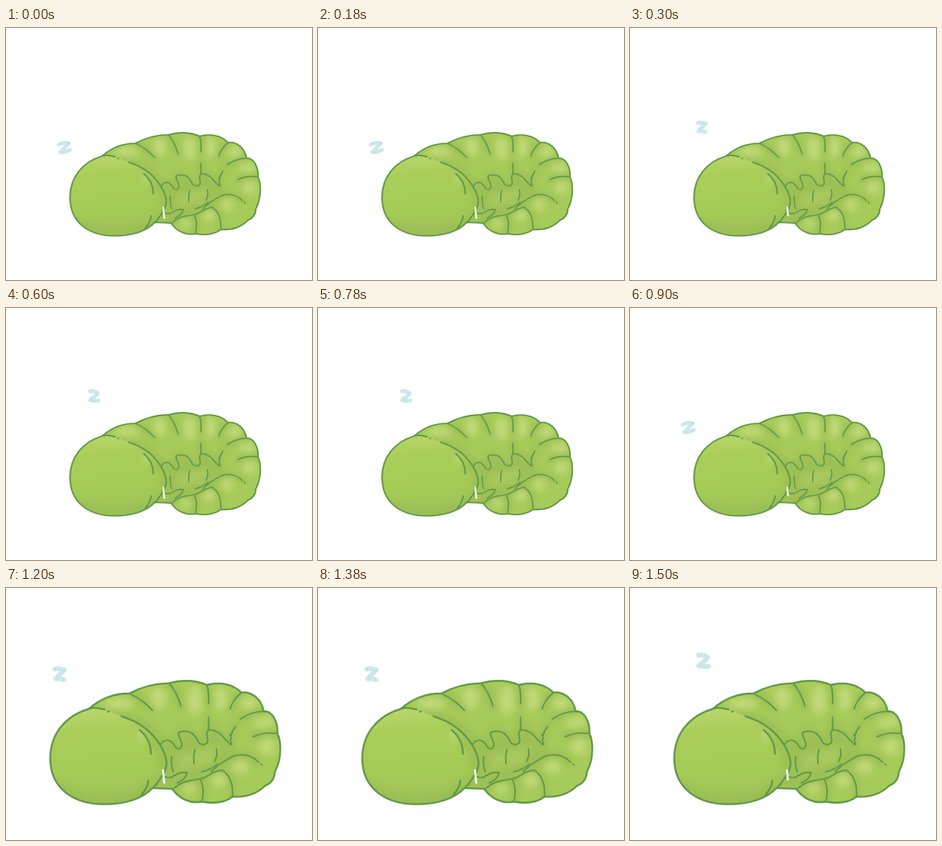
An HTML page that plays this animation: 430x354 px, repeating every 1800 ms.

```html
<!DOCTYPE html>
<html lang="en">
<head>
<meta charset="utf-8">
<title>Sleeping caterpillar</title>
<style>
  html, body { margin: 0; width: 100%; height: 100%; overflow: hidden; background: #fff; }
  svg { display: block; width: 430px; height: 354px; }
  path { stroke-linecap: round; stroke-linejoin: round; }
  .line { fill: none; stroke: #639a48; stroke-width: 2.2; }
  .fine { stroke-width: 1.8; }
  .soft { filter: url(#blur); }
  .shade { fill: none; stroke: #97b952; stroke-width: 9; opacity: .7; }
  .glow { fill: #bfd977; }
</style>
</head>
<body>
<svg viewBox="0 0 430 354">
  <defs>
    <filter id="blur" filterUnits="userSpaceOnUse" x="60" y="120" width="330" height="200">
      <feGaussianBlur stdDeviation="4"/>
    </filter>
    <linearGradient id="face" x1=".4" y1="0" x2=".5" y2="1">
      <stop offset="0" stop-color="#b9d66c"/>
      <stop offset=".2" stop-color="#abce5b"/>
      <stop offset=".65" stop-color="#a4cb55"/>
      <stop offset="1" stop-color="#a1c25c"/>
    </linearGradient>

    <path id="body" d="M135 180C145 171 160 162 182 162C197 154 214 150 228 150C243 146 258 146 272 152
      C287 148 303 151 312 161C325 159 336 170 338 183C347 182 355 194 354 209
      C358 217 360 237 351 254C351 262 346 268 340 270C328 282 314 284 302 283C292 291 277 291 266 289
      C253 292 239 285 232 274L208 273L150 280Z"/>
    <path id="head" d="M135 180C108 188 90 209 90 238C90 274 117 292 153 292C178 292 198 285 209 273
      C215 268 218 262 222 255C229 244 224 231 214 217C203 202 190 194 172 189C160 183 149 177 135 180Z"/>
    <path id="folds" d="M182 162Q197 169 209 182M228 150Q237 160 242 177M272 152Q275 162 274 174M274 190V205
      M312 161Q302 170 299 180M338 183Q324 183 311 192M354 209Q337 207 326 213
      M302 236C314 231 327 236 332 243M290 252Q303 261 302 283M265 264Q270 276 266 289"/>
    <path id="belly" d="M218 222C224 214 230 216 234 223C239 231 245 226 242 218C240 213 237 209 241 207
      C254 204 259 212 262 219C266 224 273 222 273 217C273 212 270 208 274 205C288 204 291 216 300 222L302 236
      C289 240 284 251 277 254C270 263 247 263 232 274L208 273L224 253Z"/>
    <clipPath id="inBody"><use href="#body"/></clipPath>
    <clipPath id="inHead"><use href="#head"/></clipPath>
  </defs>

  <g id="scene">
    <use href="#body" fill="#a7cb5a"/>
    <g clip-path="url(#inBody)">
      <g class="soft">
        <use href="#folds" class="shade"/>
        <use href="#belly" class="shade"/>
        <path class="shade" d="M160 184Q205 192 225 226M303 200L299 222"/>
        <g class="glow">
          <ellipse cx="170" cy="174" rx="16" ry="7"/>
          <ellipse cx="216" cy="167" rx="9" ry="13"/>
          <ellipse cx="258" cy="170" rx="9" ry="17"/>
          <ellipse cx="288" cy="168" rx="8" ry="14"/>
          <ellipse cx="321" cy="174" rx="10" ry="8"/>
          <ellipse cx="339" cy="196" rx="12" ry="7"/>
          <ellipse cx="342" cy="224" rx="10" ry="9"/>
          <ellipse cx="311" cy="248" rx="9" ry="8"/>
          <ellipse cx="286" cy="264" rx="9" ry="8"/>
          <ellipse cx="252" cy="273" rx="9" ry="5"/>
        </g>
      </g>
      <use href="#belly" fill="#9dc056"/>
      <path class="soft" fill="#adcd62" opacity=".7" d="M240 235L288 224L275 245L240 251Z"/>
    </g>
    <use href="#body" class="line"/>
    <use href="#folds" class="line fine"/>
    <path class="line fine" d="M218 222C224 214 230 216 234 223C239 231 245 226 242 218
      C240 213 237 209 241 207C254 204 259 212 262 219C266 224 273 222 273 217C273 212 270 208 274 205
      C288 204 291 216 300 222M305 201Q297 212 301 222M302 207L299 211
      M232 275C244 263 257 264 265 262C275 260 277 253 290 252M302 236Q286 244 277 254
      M231 236Q230 247 233 254M258 228Q256 236 257 244M283 227Q285 234 281 242
      M266 254Q276 252 284 245M224 260C234 264 234 253 249 255Q248 262 238 267M335 245L336 246"/>

    <use href="#head" fill="url(#face)"/>
    <g clip-path="url(#inHead)">
      <path class="soft shade" d="M100 272Q150 304 203 275M194 203Q219 222 222 247M224 250Q212 274 190 289"/>
      <ellipse class="soft glow" cx="196" cy="212" rx="4" ry="9" transform="rotate(-35 196 212)"/>
    </g>
    <path class="line" d="M153 181C147 179 141 178 135 180C108 188 90 209 90 238C90 274 117 292 153 292
      C178 292 198 285 209 273C215 268 218 262 222 255C229 244 224 231 214 217C203 202 190 194 173 189
      M157 183L158 183.5M194 205Q207 216 207 233M204 264Q203 273 196 281"/>

    <path id="drool" fill="none" stroke="#f2f8f5" stroke-width="2.4"/>
    <g fill="none" stroke-width="5.4">
      <path class="z" stroke="#d2eaeb"/>
      <path class="z" stroke="#c3e2e5" stroke-dasharray="1.2 2.2" style="stroke-linecap:butt"/>
    </g>
  </g>
</svg>
<script>
  const STEP = 300, STEPS = 6;
  const scene = document.getElementById('scene');
  const drool = document.getElementById('drool');
  const letters = document.querySelectorAll('.z');
  const zShapes = [
    'M74 164Q81 160 88 162L77 174Q84 175 90 171',
    'M95 133.5Q100 132 106 134.5L96 145Q100 144 106 146',
    'M118 117Q124 116 129 120Q125 125 118 129.5Q124 131 130 130'
  ];
  let last = -1;

  function draw(now) {
    const step = Math.floor(now / STEP) % STEPS;
    if (step !== last) {
      last = step;
      // The body swells for the last third of each breath.
      scene.setAttribute('transform', step < 4 ? '' : 'matrix(1.209 0 0 1.197 -46.6 -45.8)');
      drool.setAttribute('d', step % 2 ? 'M221 252L222 263' : 'M221 252L222.5 267');
      letters.forEach(z => z.setAttribute('d', zShapes[step % 3]));
    }
    requestAnimationFrame(draw);
  }
  draw(performance.now());
</script>
</body>
</html>
```
